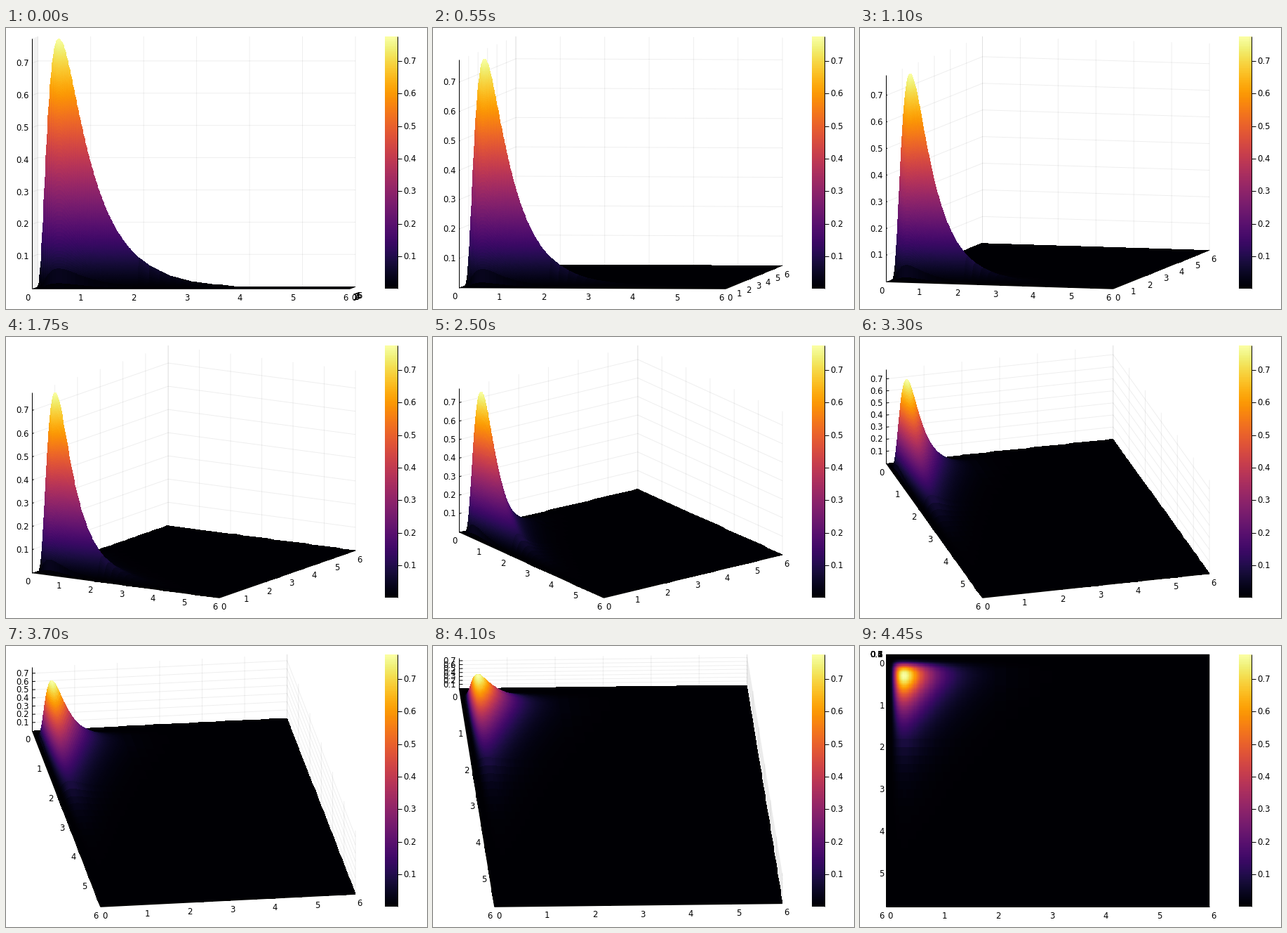
Animation of 600x400 px, one loop 5 s. Source, as a matplotlib script:

```python
import numpy as np
import matplotlib.pyplot as plt
from matplotlib.animation import FuncAnimation
from matplotlib.collections import LineCollection

WIDTH, HEIGHT, DPI = 600, 400, 100
PX = 72 / DPI                                     # one pixel in points
LEFT, RIGHT, TOP, BOTTOM = 37.3, 498, 12, 371.3   # box filled by the 3D view
BAR_LEFT, BAR_RIGHT = 540, 558
SPAN, Z_MAX = 6, 0.776
TICKS = np.arange(7)
Z_TICKS = np.arange(1, 8) / 10

plt.rcParams["font.family"] = "DejaVu Sans"
fig = plt.figure(figsize=(WIDTH / DPI, HEIGHT / DPI), dpi=DPI, facecolor="white")
ax = fig.add_axes([0, 0, 1, 1])
ax.axis("off")


def bell(u):
    """Inverse Gaussian density (mean 1, shape 2), scaled to peak at 1."""
    u = np.maximum(u, 1e-3)
    return (u / 0.5) ** -1.5 * np.exp(0.5 - (u - 1) ** 2 / u)


def project(x, y, z, degrees):
    """Screen position for equal azimuth and elevation, stretched to the box."""
    angle = np.radians(degrees)
    c, s = np.cos(angle), np.sin(angle)
    depth = np.tan(angle / 2)
    unit = (BOTTOM - TOP) / (c + depth)
    x, y, z = x / SPAN, y / SPAN, z / Z_MAX
    px = LEFT + (RIGHT - LEFT) * (x * c + y * s) / (c + s)
    py = BOTTOM - unit * (depth * ((1 - x) * s**2 + y * c**2) + z * c)
    return px, py


def segment(start, end, degrees):
    return [project(*start, degrees), project(*end, degrees)]


def label(text, ha="center"):
    return ax.text(0, 0, text, ha=ha, va="baseline", fontsize=8.4, zorder=6)


def black_line(xs, ys):
    ax.plot(xs, ys, color="black", lw=PX, solid_capstyle="butt")


# Surface, ordered from the far corner to the near one, finest on the steep front
xs = np.concatenate([np.arange(0, 2, 0.02), np.linspace(2, SPAN, 21)])
ys = np.concatenate([np.arange(0, 0.1, 0.02), np.arange(0.1, 0.34, 0.0025),
                     np.arange(0.34, 2, 0.03), np.linspace(2.02, SPAN, 20)])
X, Y = np.meshgrid(xs, ys[::-1], indexing="ij")
Z = Z_MAX * bell(X) * bell(1.5 * Y)
SHADE = (Z[1:, 1:] + Z[:-1, 1:] + Z[1:, :-1] + Z[:-1, :-1]) / 4

# Colour bar
ax.pcolormesh([BAR_LEFT, BAR_RIGHT], np.linspace(BOTTOM, TOP, 257),
              np.linspace(0, 1, 256)[:, None], cmap="inferno", antialiased=False)
black_line([BAR_RIGHT, BAR_RIGHT], [TOP, BOTTOM])
for value in Z_TICKS:
    tick_y = BOTTOM - (BOTTOM - TOP) * value / Z_MAX
    black_line([BAR_RIGHT, BAR_RIGHT + 6], [tick_y, tick_y])
    label(f"{value:.1f}", "left").set_position((BAR_RIGHT + 8, tick_y + 4))

ax.set_xlim(0, WIDTH)
ax.set_ylim(HEIGHT, 0)
ax.set_autoscale_on(False)

grid = ax.add_collection(LineCollection([], colors=[(0, 0, 0, 0.065)], linewidths=PX,
                                        snap=False, zorder=1), autolim=False)
axis_lines = ax.add_collection(LineCollection([], colors="black", linewidths=PX,
                                              zorder=5), autolim=False)
x_labels = [label(str(t)) for t in TICKS]
y_labels = [label(str(t)) for t in TICKS]
z_labels = [label(f"{t:.1f}", "right") for t in Z_TICKS]
surface = None


def grid_lines(degrees):
    lines = []
    for t in TICKS:
        lines.append(segment((0, t, 0), (0, t, Z_MAX), degrees))
        lines.append(segment((t, SPAN, 0), (t, SPAN, Z_MAX), degrees))
    for t in Z_TICKS:
        lines.append(segment((0, 0, t), (0, SPAN, t), degrees))
        lines.append(segment((0, SPAN, t), (SPAN, SPAN, t), degrees))
    return lines


def axes_and_ticks(degrees):
    lines = [segment((0, 0, 0), (0, 0, Z_MAX), degrees),
             segment((0, 0, 0), (SPAN, 0, 0), degrees),
             segment((SPAN, 0, 0), (SPAN, SPAN, 0), degrees)]
    lines += [segment((0, 0, t), (0, 0.075, t), degrees) for t in Z_TICKS]
    return lines


def place(labels, points, dx, dy, degrees):
    for text, point in zip(labels, points):
        px, py = project(*point, degrees)
        text.set_position((px + dx, py + dy))


def draw(frame):
    global surface
    degrees = min(frame + 1, 90)
    if surface is not None:
        surface.remove()
    px, py = project(X, Y, Z, degrees)
    surface = ax.pcolormesh(px, py, SHADE, cmap="inferno", vmin=0, vmax=Z_MAX,
                            shading="flat", antialiased=False, zorder=3)
    grid.set_segments(grid_lines(degrees))
    axis_lines.set_segments(axes_and_ticks(degrees))
    place(x_labels, [(t, 0, 0) for t in TICKS], -6.3, 16.7, degrees)
    place(y_labels, [(SPAN, t, 0) for t in TICKS], 6, 16.7, degrees)
    place(z_labels, [(0, 0, t) for t in Z_TICKS], -4.5, 4, degrees)
    return [surface, grid, axis_lines, *x_labels, *y_labels, *z_labels]


animation = FuncAnimation(fig, draw, frames=100, interval=50, repeat=True,
                          repeat_delay=0, init_func=lambda: [])
plt.show()
```
